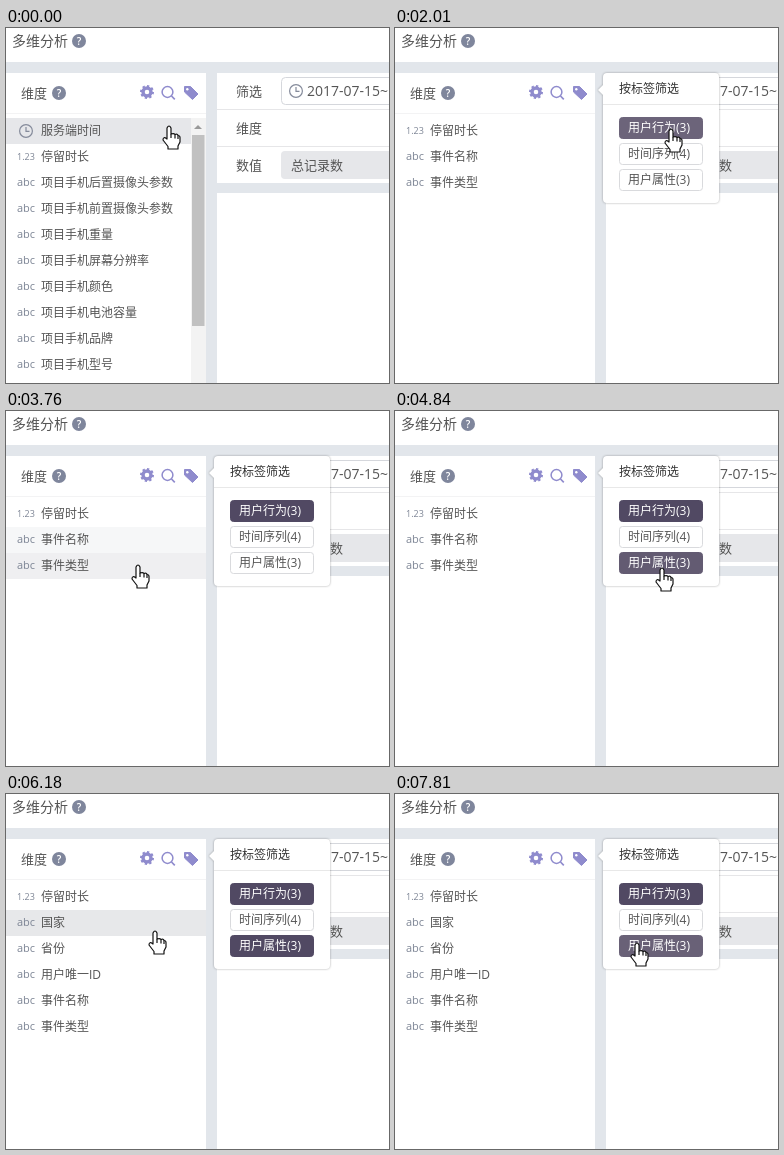
Animation, 383 px wide and 355 px high, one loop 8000 ms. Source, as an HTML page:

```html
<!DOCTYPE html>
<html lang="zh-CN">
<head>
<meta charset="utf-8">
<style>
html, body { margin: 0; width: 100%; height: 100%; overflow: hidden; background: #fff; }
svg { display: block; width: 100%; height: 100%; font-family: "Open Sans", "Noto Sans CJK SC", "Noto Sans CJK", sans-serif; }
</style>
</head>
<body>
<svg id="stage" viewBox="0 0 383 355"></svg>
<script>
const LOOP = 8000;
const INK = '#555', GREY = '#7d8595', HOVER = '#e6e7ea', PURPLE = '#8f8bcd', PALE = '#e2e6eb';

// Bursts of redraws: start, end, count
const bursts = [
  [150, 550, 4], [850, 1090, 3], [1360, 2010, 6], [2840, 3880, 9], [4030, 4180, 2],
  [4450, 5370, 7], [5520, 6450, 8], [6600, 7530, 8], [7660, 7810, 2]
];

// Cursor path: time, x, y
const path = [
  [0, 163, 98], [417, 184, 66], [1090, 185, 64], [1360, 271, 92], [1750, 276, 101], [2710, 276, 101],
  [3230, 168, 123], [3620, 136, 138], [3750, 132, 154], [4180, 115, 178],
  [4450, 172, 173], [4750, 267, 157], [5370, 267, 157], [5780, 198, 141], [6050, 149, 137],
  [6200, 149, 137], [6450, 146, 158], [7000, 152, 203], [7530, 228, 172], [7810, 242, 149]
];

// time, value
const tooltip = [[0, 0], [400, 0.5], [550, 1], [1490, 0.6], [1620, 0.2], [1750, 0]];
const popover = [[0, 0], [850, 0.4], [970, 0.8], [1090, 1]];
const listAt = [[0, 0], [1880, 1], [5200, 2]];
const pickedAt = [1750, Infinity, 4750];

const phone = ['后置摄像头参数', '前置摄像头参数', '重量', '屏幕分辨率', '颜色', '电池容量', '品牌', '型号'];
const lists = [
  ['服务端时间', '停留时长', ...phone.map(s => '项目手机' + s)],
  ['停留时长', '事件名称', '事件类型'],
  ['停留时长', '国家', '省份', '用户唯一ID', '事件名称', '事件类型']
];
const tags = ['用户行为(3)', '时间序列(4)', '用户属性(3)'];

const rect = (x, y, w, h, fill, more = '') =>
  `<rect x="${x}" y="${y}" width="${w}" height="${h}" fill="${fill}" ${more}/>`;
const text = (x, cy, s, size = 12, fill = INK, more = '') =>
  `<text x="${x}" y="${cy + size * 0.37}" font-size="${size}" fill="${fill}" ${more}>${s}</text>`;
const help = (x, y) =>
  `<circle cx="${x}" cy="${y}" r="7" fill="#7f869c"/>` + text(x, y, '?', 10, '#fff', 'text-anchor="middle" font-weight="600"');
const clock = (x, y) =>
  `<g fill="none" stroke="#858b9b" stroke-width="1.2"><circle cx="${x}" cy="${y}" r="6.4"/><path d="M${x} ${y - 4}v4.3h3.5"/></g>`;

function listRow(name, i) {
  const y = 103 + 26 * i;
  const mark = name === '服务端时间' ? clock(20, y)
    : name === '停留时长' ? text(11, y, '1.23', 9, GREY) : text(11, y - 1, 'abc', 11, GREY);
  return mark + text(35, y, name);
}

const scrollbar = rect(185, 90, 15, 265, '#f3f3f3') + rect(186, 107, 12.5, 191, '#c1c1c1')
  + '<path d="M188 101l4-4 4 4z" fill="#999"/>';

const icons = `<g fill="none" stroke="${PURPLE}">
  <circle cx="141" cy="64" r="4" stroke-width="3.4"/>
  <circle cx="141" cy="64" r="6" stroke-width="2" pathLength="16" stroke-dasharray="1"/>
  <circle cx="161.5" cy="64" r="5.4" stroke-width="1.5"/><path d="M165.5 68l3.3 3.3" stroke-width="1.7"/></g>
  <path d="M178.5 58.5h6l7.5 7.5-5.5 5.5-8-7.5z" fill="${PURPLE}" stroke="${PURPLE}" stroke-linejoin="round"/>
  <circle cx="181.3" cy="61.2" r="1.2" fill="#fff"/>`;

const page = rect(0, 0, 383, 355, PALE) + rect(0, 0, 383, 34, '#fff')
  + text(6, 13, '多维分析', 14) + help(73, 13)
  + rect(0, 45, 200, 310, '#fff') + rect(211, 45, 172, 110, '#fff') + rect(211, 165, 172, 190, '#fff')
  + [81, 118].map(y => rect(211, y, 172, 1, '#e6e6e8')).join('')
  + rect(275.5, 49.5, 120, 27, '#fff', 'rx="4" stroke="#d5d7dc"') + clock(290, 63)
  + text(301, 63, '2017-07-15~', 14)
  + ['筛选', '维度', '数值'].map((s, i) => text(230, 63 + 37 * i, s, 13)).join('')
  + rect(275, 123, 120, 28, HOVER, 'rx="4"') + text(285, 137, '总记录数', 13)
  + text(15, 65, '维度', 13) + help(53, 65) + icons + rect(0, 85, 200, 1, '#f3f3f4');

const tipBox = rect(164, 9, 80, 38, '#555', 'rx="4"') + '<path d="M179 47h11l-5.5 5z" fill="#555"/>'
  + text(204, 27, '按标签筛选', 12, '#fff', 'text-anchor="middle"');

const panel = '<g style="filter:drop-shadow(0 0 1px #0005)">' + rect(208, 45, 116, 130, '#fff', 'rx="4"')
  + '<path d="M208 57l-5 5 5 5z" fill="#fff"/></g>'
  + text(224, 61, '按标签筛选', 12, '#333') + rect(208, 76, 116, 1, '#e8e8e8')
  + tags.map((s, i) => `<g class="tag">${rect(224.5, 89.5 + 26 * i, 83, 21, '#fff', 'rx="3"')}${text(233, 100 + 26 * i, s)}</g>`).join('');

const hand = `<g stroke="#111" stroke-width="1.2" stroke-linejoin="round">
  <path fill="#fff" d="M-2 13V2q2-4 4 0v6q3-1 4 .5 2.500-1 3 1 2 0 2 2V16l-2 4v3H-1v-2.500L-6 14q0-4 4-1z"/>
  <path d="M2 8v4M6 8.500v4M9 9.500v3.500"/></g>`;

const stage = document.getElementById('stage');
stage.innerHTML = page
  + lists[0].map((_, i) => rect(0, 90 + 26 * i, 200, 26, HOVER, 'class="row" opacity="0"')).join('')
  + lists.map((l, i) => `<g class="list">${l.map(listRow).join('')}${i ? '' : scrollbar}</g>`).join('')
  + `<g id="tip">${tipBox}</g><g id="pop">${panel}</g><g id="hand">${hand}</g>`;

const all = sel => [...stage.querySelectorAll(sel)];
const rowEls = all('.row'), listEls = all('.list'), tagEls = all('.tag');
const [tipEl, popEl, handEl] = ['tip', 'pop', 'hand'].map(id => document.getElementById(id));

const valueAt = (track, t) => track.filter(k => k[0] <= t).pop()[1];
const mix = (a, b, k) => `rgb(${a.map((v, i) => Math.round(v + (b[i] - v) * k))})`;

function cursorAt(t) {
  const next = path.findIndex(p => p[0] > t);
  if (next < 0) return path[path.length - 1].slice(1);
  const a = path[next - 1], b = path[next], k = (t - a[0]) / (b[0] - a[0]);
  return [1, 2].map(i => a[i] + (b[i] - a[i]) * k);
}

// Hover shades ease towards their goal by a fixed share at each step.
const ease = (from, goal) => from + (goal - from) * 0.65;
const times = [0, ...bursts.flatMap(([from, to, n]) =>
  Array.from({ length: n }, (_, i) => from + (to - from) * i / (n - 1)))];
let rows = lists[0].map((_, i) => i ? 0 : 1), hot = [0, 0, 0];
const states = times.map(t => {
  const [x, y] = cursorAt(t);
  const count = lists[valueAt(listAt, t)].length;
  const over = x < 200 ? Math.floor((y - 90) / 26) : -1;
  rows = rows.map((v, i) => ease(v, i === over && i < count ? 1 : 0));
  hot = hot.map((v, i) => ease(v, x >= 224 && x <= 308 && Math.abs(y - 100 - 26 * i) <= 11 ? 1 : 0));
  return { t, x, y, rows, hot };
});

function draw(s) {
  const list = valueAt(listAt, s.t);
  rowEls.forEach((el, i) => el.setAttribute('opacity', s.rows[i] < 0.03 ? 0 : s.rows[i]));
  listEls.forEach((el, i) => el.setAttribute('visibility', i === list ? 'visible' : 'hidden'));
  tagEls.forEach((el, i) => {
    const on = s.t >= pickedAt[i], [box, label] = el.children;
    const fill = on ? mix([81, 73, 99], [108, 100, 122], s.hot[i]) : '#fff';
    box.setAttribute('fill', fill);
    box.setAttribute('stroke', on ? fill : '#d9dadd');
    label.setAttribute('fill', on ? '#fff' : INK);
    label.setAttribute('font-weight', on ? 500 : 400);
  });
  tipEl.setAttribute('opacity', valueAt(tooltip, s.t));
  popEl.setAttribute('opacity', valueAt(popover, s.t));
  handEl.setAttribute('transform', `translate(${s.x} ${s.y})`);
}

let shown;
function tick() {
  const t = performance.now() % LOOP;
  const state = states.filter(s => s.t <= t).pop();
  if (state !== shown) draw(shown = state);
  requestAnimationFrame(tick);
}
tick();
</script>
</body>
</html>
```
